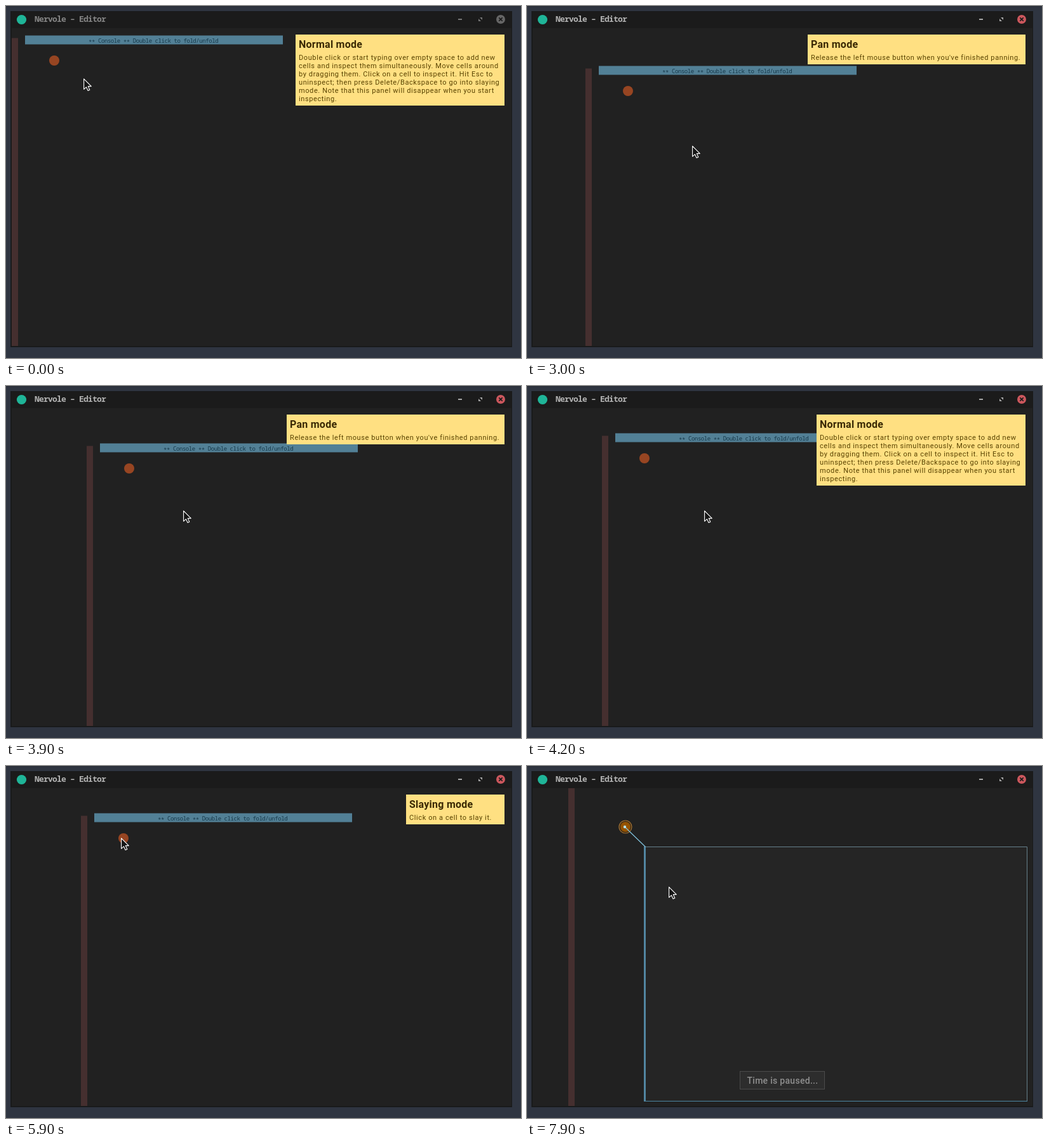
An HTML page for the animation above (8000 ms loop, 811 by 555 pixels).

```html
<!DOCTYPE html>
<html lang="en">
<head>
<meta charset="utf-8">
<title>Editor</title>
<style>
  html, body { margin: 0; width: 100%; height: 100%; overflow: hidden; background: #2f3541; }
  svg { display: block; }
  text { white-space: pre; }
  .mono { font-family: "Noto Sans Mono", "DejaVu Sans Mono", monospace; }
  .title { font-size: 13px; font-weight: 600; letter-spacing: -.8px; }
  .console { font-size: 9px; letter-spacing: -.42px; fill: #17384a; }
  .panel { font-family: Roboto, sans-serif; font-size: 11px; letter-spacing: .6px; fill: #594300; }
  .panel .head { font-size: 16px; font-weight: 700; letter-spacing: .25px; fill: #3a2903; }
  .paused { font-family: Roboto, sans-serif; font-size: 14px; font-weight: 500; letter-spacing: .28px; fill: #8f8f8f; }
</style>
</head>
<body>
<svg width="811" height="555" viewBox="0 0 811 555">
  <defs>
    <clipPath id="body"><rect x="9" y="35" width="787" height="501"/></clipPath>
  </defs>
  <rect width="811" height="555" fill="#2f3541"/>
  <rect width="811" height="2" fill="#2a2f3a"/>
  <rect x="7" y="8" width="790" height="530" fill="#191a1b"/>
  <rect x="9" y="9" width="787" height="26" fill="#1b1b1b"/>
  <rect x="9" y="35" width="787" height="501" fill="#212121"/>

  <circle cx="24.5" cy="21.5" r="7.6" fill="#1fb598"/>
  <text id="title" class="mono title" x="45" y="25">Nervole – Editor</text>
  <g id="buttons">
    <rect x="712" y="20" width="6" height="2"/>
    <path d="M746 18h4v4zM744 20v4h4z"/>
  </g>
  <circle id="close" cx="779" cy="21" r="7"/>
  <path d="M776.3 18.3l5.4 5.4m0-5.4l-5.4 5.4" stroke="#1b1b1b" stroke-width="1.7"/>

  <g clip-path="url(#body)">
    <g id="world">
      <rect x="9" y="50.5" width="10" height="600" fill="#452f2f"/>
      <rect x="30" y="46.5" width="406" height="14" fill="#528096"/>
      <text class="mono console" x="130" y="58"><tspan dy="2">**</tspan><tspan dy="-2"> Console </tspan><tspan dy="2">**</tspan><tspan dy="-2"> Double click to fold/unfold</tspan></text>
      <circle id="oldCell" cx="76" cy="86" r="8" fill="#974522"/>
      <g id="newCell">
        <circle cx="99" cy="141" r="10" fill="#35291a" stroke="#a87432" stroke-width="1.2"/>
        <circle cx="99" cy="141" r="8" fill="#955300"/>
      </g>
    </g>
    <g id="panels"></g>
    <g id="inspector">
      <rect x="185" y="127" width="603" height="402" fill="#252525"/>
      <path d="M185 127.5H787.5V529" fill="none" stroke="#66818c"/>
      <path d="M185 528.5H788" stroke="#4d87a3"/>
      <rect x="184" y="127" width="3" height="402" fill="#5286a2"/>
      <line id="link" x2="186.5" y2="127.5" stroke="#83c5df" stroke-width="1.2"/>
      <circle id="dot" r="2.2" fill="#b5e5f5"/>
      <rect x="335.5" y="481.5" width="133" height="28" fill="#2d2d2d" stroke="#4b4b4b"/>
      <text class="paused" x="346.5" y="501">Time is paused...</text>
    </g>
  </g>
  <path id="cursor" d="M.6.8V17.3L4.4 13.8 7.1 19.4 9.8 18.2 7.3 12.6H12.3Z" fill="#151515" stroke="#fff" stroke-width="1.1" stroke-linejoin="round"/>
</svg>
<script>
const LOOP = 8000, STEP = 100;
const LEAD = 200; // the view trails the dragging cursor by this much
const $ = id => document.getElementById(id);
const show = (id, on) => $(id).setAttribute("display", on ? "inline" : "none");

const panels = {
  normal: [456, "Normal mode",
    "Double click or start typing over empty space to add new",
    "cells and inspect them simultaneously. Move cells around",
    "by dragging them. Click on a cell to inspect it. Hit Esc to",
    "uninspect; then press Delete/Backspace to go into slaying",
    "mode. Note that this panel will disappear when you start",
    "inspecting."],
  pan: [442, "Pan mode", "Release the left mouse button when you've finished panning."],
  slay: [630, "Slaying mode", "Click on a cell to slay it."]
};

$("panels").innerHTML = Object.entries(panels).map(([id, [x, head, ...lines]]) => `
  <g id="${id}" class="panel">
    <rect x="${x}" y="45" width="${785 - x}" height="${34 + 13 * lines.length}" fill="#ffe082"/>
    <text class="head" x="${x + 5}" y="66">${head}</text>
    ${lines.map((line, i) => `<text x="${x + 5}" y="${85 + 13 * i}">${line}</text>`).join("")}
  </g>`).join("");

const ease = k => k * k * (3 - 2 * k);
const mix = (a, b, k) => a + (b - a) * k;
const span = (t, from, to, lead = 0) =>
  t <= from ? 0 : Math.min(1, (t + lead - from) / (to - from));

function glide([x, y], t, from, to, [endX, endY]) {
  const k = ease(span(t, from, to));
  return [mix(x, endX, k), mix(y, endY, k)];
}

// Drag out to the lower right, then swirl once and settle.
function dragAt(t, lead = 0) {
  const out = ease(span(t, 2500, 3100, lead));
  const k = span(t, 3200, 4100, lead), turn = 1 - (1 - k) ** 2.2;
  return [
    90 * out + 19 * turn - 42 * Math.sin(2 * Math.PI * turn),
    52 * out - 24 * k - 11 * Math.sin(2 * Math.PI * k)
  ];
}

const viewAt = t => glide(dragAt(t), t, 7100, 7300, [56, -45]).map(Math.round);

function cursorAt(t) {
  const swing = Math.sin(Math.PI * span(t, 1900, 2400)) ** 2;
  const [dragX, dragY] = dragAt(t, LEAD);
  let pos = glide([122, 114], t, 900, 1400, [120, 173]);
  pos = glide(pos, t, 1900, 2400, [170, 168]);
  pos = [pos[0] + 14 * swing + dragX, pos[1] + 29 * swing + dragY];
  pos = glide(pos, t, 4400, 4500, [277, 197]);
  pos = glide(pos, t, 5000, 5900, [181, 113]);
  pos = glide(pos, t, 5900, 6400, [202, 142]);
  pos = glide(pos, t, 6500, 6800, [207, 169]);
  return glide(pos, t, 7600, 7900, [223, 190]).map(Math.round);
}

function panelAt(t) {
  if (t >= 7200) return "";
  if (t >= 2600 && t < 4200) return "pan";
  if (t >= 5500 && t < 6200) return "slay";
  return "normal";
}

function render(t) {
  const [vx, vy] = viewAt(t);
  const active = t >= 2000, inspecting = t >= 7200;

  $("cursor").setAttribute("transform", `translate(${cursorAt(t)})`);
  $("world").setAttribute("transform", `translate(${vx} ${vy})`);
  $("title").setAttribute("fill", active ? "#b4b4b4" : "#868686");
  $("buttons").setAttribute("fill", active ? "#a8a8a8" : "#777");
  $("close").setAttribute("fill", active ? "#cc575d" : "#666");

  for (const id in panels) show(id, id === panelAt(t));
  show("oldCell", t < 6000);
  show("newCell", inspecting);
  show("inspector", inspecting);
  $("link").setAttribute("x1", vx + 98);
  $("link").setAttribute("y1", vy + 141);
  $("dot").setAttribute("cx", vx + 98);
  $("dot").setAttribute("cy", vy + 141);
}

const start = performance.now();
function tick() {
  const t = (performance.now() - start) % LOOP;
  render(Math.floor(t / STEP) * STEP);
  requestAnimationFrame(tick);
}
tick();
</script>
</body>
</html>
```
